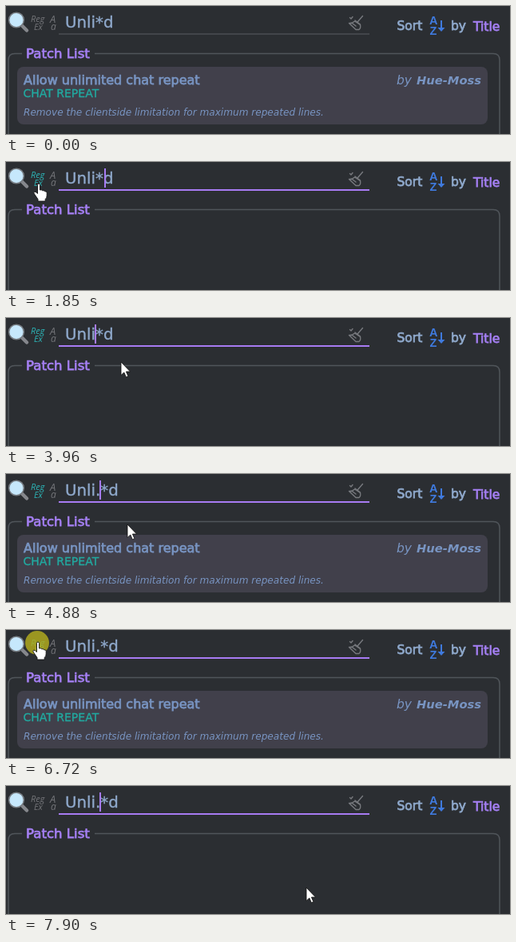
These frames come from a looping animation (631x160 px, 8 s). An HTML page:

```html
<!DOCTYPE html>
<html lang="en">
<head>
<meta charset="utf-8">
<title>Patch search</title>
<style>
  html, body { margin: 0; width: 100%; height: 100%; overflow: hidden; background: #2b2e32; }
  svg { display: block; width: 631px; height: 160px; }
  text { font-family: "DejaVu Sans", Verdana, sans-serif; white-space: pre; }
  .semi { stroke-width: .75px; stroke: currentColor; fill: currentColor; }
  .light { stroke-width: .35px; }
  .blue { color: #7894c2; }
  .soft { color: #8fa9cc; }
  .purple { color: #a47ff2; }
  .teal { color: #22a9a0; }
  .toggle { font-family: "Open Sans", "Noto Sans", sans-serif; font-style: italic; fill: #737478; }
  .on .regex { fill: #2cb3b5; }
  .az { font: bold 14.5px "Liberation Sans", Arial, sans-serif; fill: #3f7ade; }
  .idle { fill: #5b5d62; }
  .focus { fill: #a77bf3; }
</style>
</head>
<body>
<svg viewBox="0 0 631 160">
  <rect width="631" height="160" fill="#2b2e32"/>

  <!-- search bar -->
  <path d="M20.500 25l5.500 5.500" stroke="#85878c" stroke-width="4.500" stroke-linecap="round"/>
  <circle cx="13" cy="17.500" r="9.300" fill="#c6e8fc" stroke="#777d83" stroke-width="1.6"/>
  <g id="regex">
    <text class="toggle regex" x="31" y="20" font-size="11">Reg</text>
    <text class="toggle regex" x="35" y="30" font-size="11">Ex</text>
  </g>
  <text class="toggle" x="55" y="21" font-size="13">A</text>
  <text class="toggle" x="56" y="30" font-size="12">a</text>
  <text id="query" class="semi light soft" x="74" y="26.500" font-size="19.8"></text>
  <rect id="line" x="66" width="389"/>
  <rect id="caret" class="focus" y="8" width="2" height="24"/>
  <g fill="none" stroke="#77797e" stroke-width="1.4" stroke-linecap="round" stroke-linejoin="round">
    <path d="M446.500 12.500l-6 7M437 18l6.500 5"/>
    <path d="M436.500 19q-3 3-7 2.500l8.500 8h4q2.500-2 1.500-6zM434 22l4 3"/>
    <path d="M430.500 14.500l1.500 1.500l2-2.500"/>
  </g>

  <!-- sorting -->
  <text class="semi soft" x="489.500" y="30" font-size="15.5">Sort</text>
  <text class="az" x="530" y="23">A</text>
  <text class="az" x="530.500" y="36">Z</text>
  <path d="M545 18v11" stroke="#3f7ade" stroke-width="2"/>
  <path d="M540.500 27h9l-4.500 5z" fill="#3f7ade"/>
  <text class="semi soft" x="557" y="30" font-size="15.5">by</text>
  <text class="semi purple" x="585" y="31" font-size="15.5">Title</text>

  <!-- patch list -->
  <path d="M20 59.500H11Q3 59.500 3 67.500V170H618V67.500Q618 59.500 610 59.500H111" fill="none" stroke="#50555a" stroke-width="1.5"/>
  <text class="semi purple" x="25" y="65" font-size="16.6">Patch List</text>
  <g id="card">
    <rect x="14" y="76" width="589" height="72" rx="8" fill="#41404b"/>
    <text class="semi blue" x="22" y="98" font-size="16">Allow unlimited chat repeat</text>
    <text class="semi light teal" x="21.500" y="114" font-size="14">CHAT REPEAT</text>
    <text x="22" y="137" font-size="12.1" font-style="italic" fill="#7894c2">Remove the clientside limitation for maximum repeated lines.</text>
    <text x="489" y="98" font-size="15.5" font-style="italic" fill="#7894c2">by</text>
    <text x="595" y="98" font-size="14.7" font-style="italic" font-weight="bold" text-anchor="end" fill="#7894c2">Hue-Moss</text>
  </g>

  <!-- pointer -->
  <g id="pointer">
    <circle id="press" r="15" cy="1" fill="#b5ad1d" opacity=".82"/>
    <path id="arrow" d="M0 0V16.500L3.800 13L6.300 18.800L8.900 17.700L6.400 12H11.500Z" fill="#fff" stroke="#111" stroke-width=".8"/>
    <path id="hand" d="M-.5 1.500a1.500 1.500 0 0 1 3 0V8q3-.8 3 .8q3-.6 3 1q2.700-.6 2.700 1.700V15q0 3-2 4.500V22H0v-2.500L-4.500 13q-1.500-2.400 .2-2.800Q-2.500 10-.5 12.500Z" fill="#fff" stroke="#111" stroke-width=".9"/>
    <path id="beam" d="M-3-8h2.300L0-7.300L.7-8H3M0-7.500V7.500M-3 8h2.300L0 7.300L.7 8H3" fill="none" stroke="#e8e8e8" stroke-width="1.1"/>
  </g>
</svg>
<script>
  const LOOP = 8000, TICK = 7900 / 60;
  const $ = id => document.getElementById(id);
  const show = (id, on) => { $(id).style.display = on ? "" : "none"; };
  const within = (k, a, b) => k >= a && k < b;

  // tick, x, y, shape held until the next entry
  const path = [
    [1, 347, 148, "arrow"], [3, 270, 118, "arrow"], [5, 125, 70, "arrow"], [7, 57, 43, "arrow"], [8, 56, 42, "arrow"],
    [9, 46, 34, "hand"], [10, 40, 27, "hand"], [14, 40, 27, "hand"], [15, 53, 27, "hand"],
    [16, 78, 25, "beam"], [20, 110, 24, "beam"], [22, 110, 24, "beam"],
    [24, 105, 42, "arrow"], [28, 136, 51, "arrow"], [30, 144, 55, "arrow"], [32, 152, 63, "arrow"], [41, 152, 63, "arrow"],
    [44, 122, 57, "arrow"], [48, 50, 38, "arrow"], [49, 42, 21, "hand"], [50, 39, 15, "hand"], [53, 39, 15, "hand"],
    [54, 43, 25, "hand"], [55, 56, 39, "arrow"], [56, 75, 46, "arrow"], [57, 150, 68, "arrow"],
    [59, 340, 118, "arrow"], [60, 376, 127, "arrow"]
  ];

  // tick ranges with a visible caret, and its x
  const carets = [
    [12, 16, 123], [20, 24, 111], [28, 32, 111],
    [35, 39, 117], [43, 47, 117], [56, 61, 117]
  ];

  function movePointer(k) {
    show("pointer", k >= 1);
    if (k < 1) return;
    let i = path.length - 1;
    while (path[i][0] > k) i--;
    const a = path[i], b = path[i + 1] || a;
    const p = b === a ? 0 : (k - a[0]) / (b[0] - a[0]);
    const x = a[1] + (b[1] - a[1]) * p, y = a[2] + (b[2] - a[2]) * p;
    $("pointer").setAttribute("transform", `translate(${Math.round(x)} ${Math.round(y)})`);
    for (const s of ["arrow", "hand", "beam"]) show(s, s === a[3]);
    show("press", k === 11 || k === 20 || k === 51);
  }

  function render(t) {
    // the screen refreshes in ticks, so motion holds between them
    const k = Math.floor((t + 12) / TICK);
    const focused = k >= 12, typed = k >= 35;
    $("query").textContent = typed ? "Unli.*d" : "Unli*d";
    $("regex").setAttribute("class", within(k, 12, 52) ? "on" : "");
    const line = $("line");
    line.setAttribute("class", focused ? "focus" : "idle");
    line.setAttribute("y", focused ? 34 : 34.5);
    line.setAttribute("height", focused ? 2 : 1);
    show("card", k < 12 || within(k, 35, 52));
    const c = carets.find(([a, b]) => within(k, a, b));
    show("caret", !!c);
    if (c) $("caret").setAttribute("x", c[2]);
    movePointer(k);
  }

  const start = performance.now();
  function frame() {
    render((performance.now() - start) % LOOP);
    requestAnimationFrame(frame);
  }
  frame();
</script>
</body>
</html>
```
